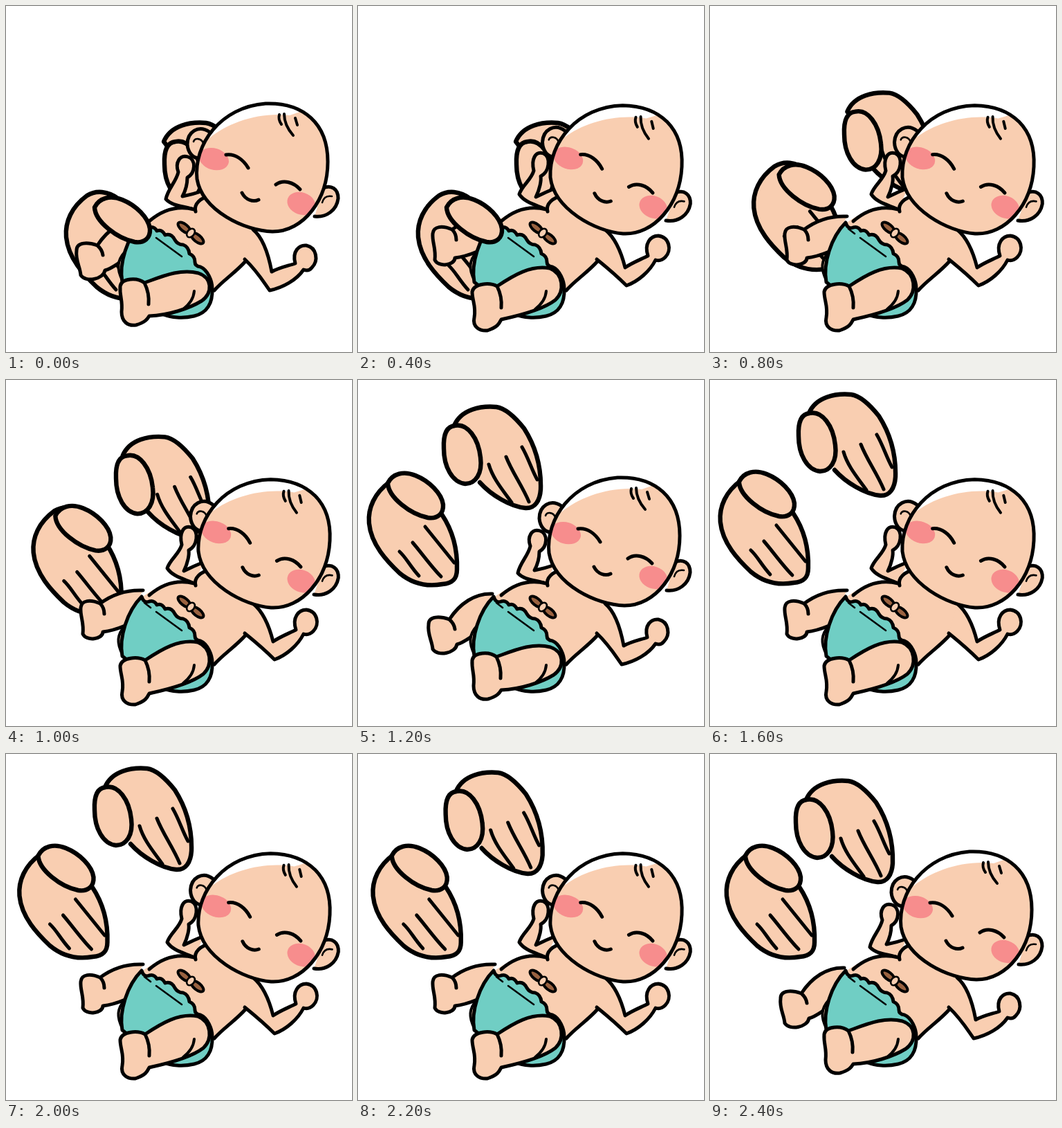
An HTML page that plays this animation: 500 px wide and 500 px high, repeating every 2.5 s.

```html
<!DOCTYPE html>
<html lang="en">
<head>
<meta charset="utf-8">
<title>Baby massage</title>
<style>
html, body { margin: 0; width: 100%; height: 100%; overflow: hidden; background: #fff }
svg { display: block; width: 100vw; height: 100vh }
path, ellipse { fill: none; stroke: #000; stroke-width: 5; stroke-linecap: round; stroke-linejoin: round }
.skin { fill: #f9ceb1 }
.bold { stroke-width: 6.4 }
.thin { stroke-width: 4 }
.fine { stroke-width: 2.6 }
.teal { fill: #70cec4 }
.brown { fill: #9a6240 }
.blush { fill: #f78d8d; stroke: none }
.shine { fill: #fff; stroke: none }
.flat { stroke: none }
</style>
</head>
<body>
<svg viewBox="0 0 500 500">
  <g id="leftHand">
    <path class="skin bold" d="M92 152C76 140 59 139 46 147C24 163 14 185 16 207C19 238 42 262 60 279C78 294 100 299 122 295C136 294 143 288 143 274C144 245 137 218 121 194"/>
    <path d="M97 212L139 264M79 235C92 250 106 270 120 284M60 248C70 257 75 269 88 283"/>
  </g>
  <g id="rightHand">
    <path class="skin bold" d="M150 80L139 66C149 42 178 37 200 39C214 41 228 55 240 70C256 95 265 125 264 158C263 174 256 186 242 185C220 183 192 166 176 148"/>
    <path d="M189 122C195 143 210 160 222 177M214 111C223 134 237 152 247 176M237 97C246 112 251 130 259 144"/>
  </g>
  <g id="rightThumb">
    <path class="skin bold" d="M140 66C158 62 174 84 177 112C180 135 170 150 155 150C136 148 124 125 124 99C123 78 128 67 140 66Z"/>
  </g>

  <g id="baby">
    <path class="skin" id="leftLeg"/>
    <path class="skin" id="leftArm"/>
    <path class="skin flat" d="M300 272C280 275 274 288 272 295C242 288 220 297 195 315L285 384L298 412C312 396 330 386 348 366L362 322Z"/>
    <path d="M296 274C281 277 271 286 274 297M272 294C244 287 222 298 207 311M346 369C333 384 313 397 301 411"/>
    <path class="skin" id="rightArm"/>
    <path class="skin thin" d="M172 355C160 368 160 380 168 396"/>
    <path class="teal" d="M196 313Q199 323 207 320Q214 318 218 325Q225 322 230 331Q239 328 244 338Q248 345 256 345Q264 348 265 358Q273 361 273 370Q273 376 281 377C291 381 298 397 298 408C299 430 290 444 272 448C255 452 238 450 228 446L168 399C163 372 175 334 196 313Z"/>
    <path class="fine" d="M200 322L209 329M217 335L254 362"/>
    <path class="skin" id="rightLeg"/>
    <path class="thin" d="M272 412C271 424 264 432 256 438"/>
    <g transform="rotate(39 267 328)">
      <ellipse class="brown thin" cx="255" cy="328" rx="11" ry="5"/>
      <ellipse class="brown thin" cx="279" cy="328" rx="11" ry="5"/>
      <ellipse class="skin fine" cx="267" cy="328" rx="5" ry="7"/>
    </g>
    <g id="head">
      <path class="skin" d="M294 182C278 171 262 182 262 200C263 212 270 220 279 220M458 263C470 258 480 264 480 278C478 295 463 306 446 304"/>
      <path class="fine" d="M271 196C273 190 282 191 285 198M457 284C459 276 465 274 471 275"/>
      <path class="skin flat" id="skull"/>
      <path class="shine" d="M294 191C314 148 375 126 430 151L410 158C365 153 320 169 294 191Z"/>
      <ellipse class="blush" cx="300.500" cy="221" rx="22" ry="15.500" transform="rotate(17 300 221)"/>
      <ellipse class="blush" cx="427" cy="285.500" rx="21" ry="16" transform="rotate(20 427 285)"/>
      <path id="skullLine"/>
      <path d="M318 215C331 213 343 222 350 234M390 258C401 250 416 255 425 265M341 270C346 280 357 284 365 280"/>
      <path class="thin" d="M395 157Q393 164 398 171M402 156C402 170 408 179 415 187M418 162L421 172"/>
    </g>
  </g>

  <g id="leftThumb">
    <path class="skin bold" d="M43 149C50 135 66 131 83 138C103 146 121 164 123 180C124 194 114 201 101 199C76 194 44 170 43 149Z"/>
  </g>
</svg>
<script>
const el = id => document.getElementById(id);
const move = (id, x, y) => el(id).setAttribute('transform', `translate(${x} ${y})`);
const clamp = v => Math.max(0, Math.min(1, v));

const skull = 'M276 250C271 200 310 146 375 141C430 139 465 170 465 225C465 280 430 326 385 326C345 325 284 296 276 250Z';
for (const id of ['skull', 'skullLine']) el(id).setAttribute('d', skull);

// Each limb has a low and a raised pose with matching commands.
const limbs = {
  leftLeg: [
    'M194 309C169 308 147 323 132 346C118 341 102 341 102 353C100 368 107 376 108 389C115 400 141 395 143 382C152 380 160 373 170 367M132 346Q139 352 140 360',
    'M198 304C177 303 156 308 136 323C122 317 109 318 108 329C107 342 113 350 111 367C116 378 140 375 140 364C150 363 160 360 172 355M136 323Q142 329 142 338'],
  leftArm: [
    'M284 267C274 271 265 273 255 275C261 264 262 255 262 248C274 241 275 222 263 218C251 214 244 227 249 240C246 254 234 264 231 279C240 289 255 289 272 294',
    'M286 263C276 267 267 271 257 276C263 264 265 252 264 246C277 240 279 218 268 213C256 209 250 222 254 238C250 252 237 259 233 272C241 284 256 287 272 294'],
  rightArm: [
    'M357 323C368 332 378 352 384 384C395 378 406 376 418 372C413 354 424 345 434 346C449 349 452 368 442 378C439 382 435 383 430 381C420 396 400 407 381 411C373 400 363 383 345 366',
    'M357 323C368 332 379 350 386 378C396 371 407 367 419 361C413 343 423 332 434 332C450 334 454 353 444 363C440 367 436 369 430 367C422 383 405 398 388 404C377 393 366 383 345 366'],
  rightLeg: [
    'M200 400C190 392 167 393 165 405C164 420 169 425 167 442C167 456 176 463 188 461C201 457 204 453 207 448C235 447 265 437 283 426C299 414 298 393 278 386C252 379 225 391 200 400C205 410 207 420 206 431',
    'M201 405C190 399 167 401 165 413C165 426 171 434 168 450C165 464 176 470 187 469C202 464 204 459 207 453C235 447 268 438 285 425C299 412 297 387 277 379C250 374 225 389 201 405C206 415 208 425 207 436']
};

function mix(a, b, t) {
  const to = b.match(/[\d.]+/g);
  let i = 0;
  return a.replace(/[\d.]+/g, v => (+v + (to[i++] - v) * t).toFixed(2));
}

function draw(now) {
  const n = Math.floor(now % 2500 / 100);

  // Wriggle: one cycle every six steps.
  const t = Math.sin(Math.PI * n / 6) ** 2 / 0.75;
  for (const id in limbs) el(id).setAttribute('d', mix(...limbs[id], t));
  el('head').setAttribute('transform', `translate(${1.7 * t} ${2 * t}) rotate(${2.9 * t} 364 253)`);

  // Hands rest on the baby, lift away, then hover.
  const near = clamp((12 - n) / 6);
  const drift = n > 12 ? -4.5 + (n - 13) * 1.14 : 0;
  const rise = n > 12 ? -2 : 0;
  const lift = clamp(Math.min(n - 12, 24 - n) / 3);
  move('leftHand', 71 * near + drift, 127 * near + rise);
  move('leftThumb', 85 * near + drift, 142 * near + rise);
  move('rightHand', 89 * near + 4 * lift, 130 * near - 18 * lift);
  move('rightThumb', 105 * near + 4 * lift, 130 * near - 18 * lift);
  requestAnimationFrame(frame);
}

const start = performance.now();
const frame = () => draw(performance.now() - start);
frame();
</script>
</body>
</html>
```
